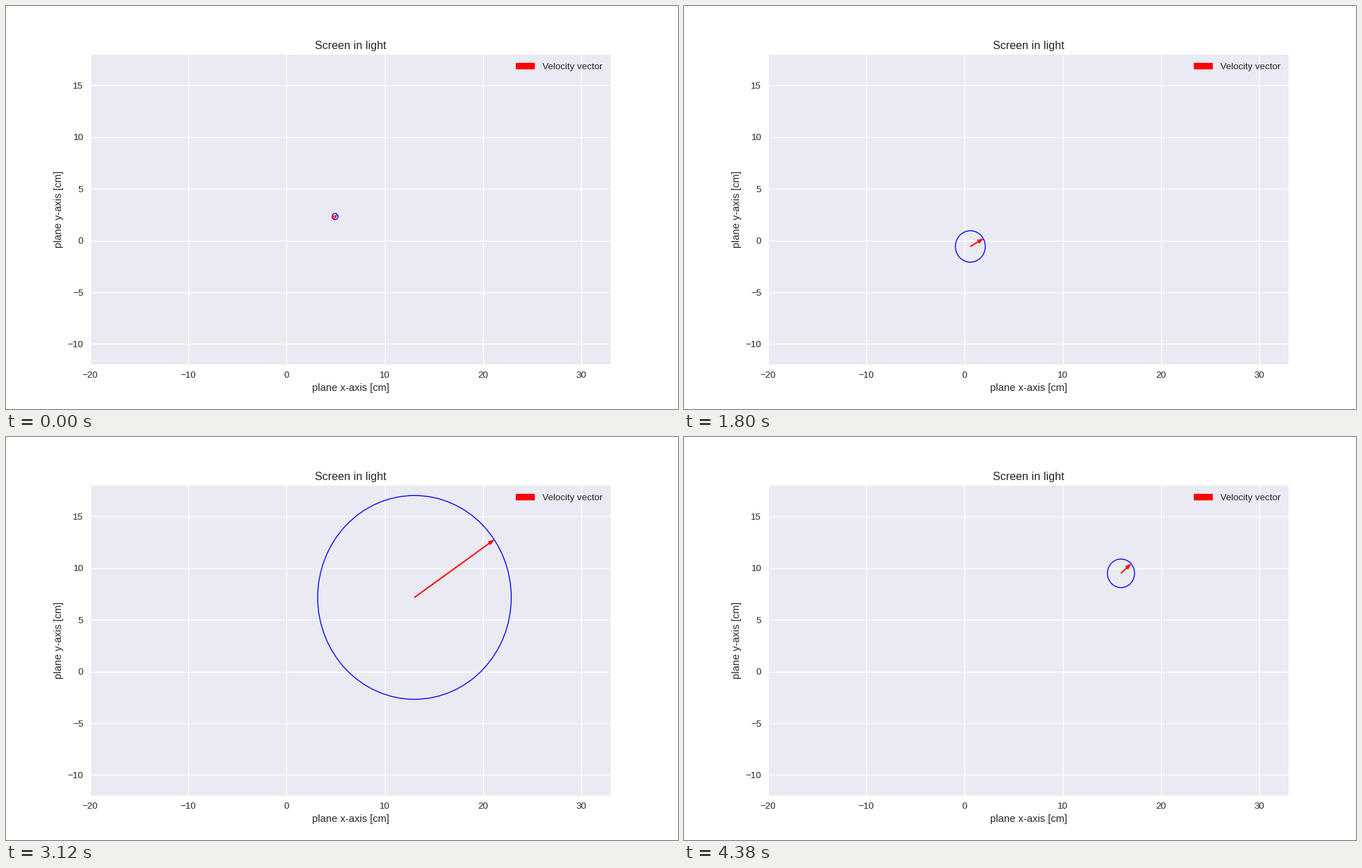
Write a matplotlib script that moves like this. It is 966x580 px and loops after 6.16 s.

```python
import numpy as np
import matplotlib.pyplot as plt
from matplotlib.animation import FuncAnimation
from matplotlib.patches import Circle, FancyArrow

plt.style.use("seaborn-v0_8")
plt.rcParams["font.family"] = "Liberation Sans"

WIDTH, HEIGHT, DPI = 966, 580, 96.6
INTERVAL = 20          # ms per animation frame
FRAMES = 308
TICKS_PER_STEP = 3     # the picture advances every 60 ms
LAST_STEP = 73
DT = 0.1               # simulated seconds per step
START = (4.94, 2.32)

# Turning points of the motion: {step: signed speed} and {step: heading in degrees}
SPEED = {0: 0.3, 2: -4.7, 7: -2.05, 13: -5.9, 15: -3.33, 22: 1.8, 26: 0.25,
         30: 1.52, 34: 2.03, 38: 4.6, 41: 4.86, 45: 12.2, 46: 12.16, 52: 9.85,
         56: 3.0, 59: 7.5, 62: -0.6, 66: -3.3, 73: 1.38}
HEADING = {15: 32.4, 20: 15, 30: 29.6, 38: 25, 42: 25, 46: 36.9, 52: 34.5,
           59: 44.3, 73: 42}


def ramp(points):
    """Straight ramps between the turning points, one value per step."""
    return np.interp(np.arange(LAST_STEP + 1), list(points), list(points.values()))


angle = np.radians(ramp(HEADING))
velocity = ramp(SPEED)[:, None] * np.column_stack([np.cos(angle), np.sin(angle)])
moves = (velocity[1:] + velocity[:-1]) / 2 * DT
position = np.cumsum(np.vstack([START, moves]), axis=0)

# the small margin keeps the pixel size from being rounded down
fig, ax = plt.subplots(
    figsize=((WIDTH + 0.01) / DPI, (HEIGHT + 0.01) / DPI), dpi=DPI)
ax.set(xlim=(-20, 33), ylim=(-12, 18), title="Screen in light",
       xlabel="plane x-axis [cm]", ylabel="plane y-axis [cm]")
ax.set_xticks(range(-20, 31, 10))
ax.set_yticks(range(-10, 16, 5))

circle = ax.add_patch(Circle(START, 1, fill=False, color="blue", lw=1))
arrow = ax.add_patch(FancyArrow(
    *START, 1, 1, width=0.1, head_width=0.4, head_length=0.6,
    length_includes_head=True, color="red", label="Velocity vector"))
legend = ax.legend(handles=[arrow], loc="upper right")


def update(frame):
    step = min(frame // TICKS_PER_STEP, LAST_STEP)
    (x, y), (vx, vy) = position[step], velocity[step]
    speed = np.hypot(vx, vy)
    circle.set(center=(x, y), radius=speed)
    arrow.set_data(x=x, y=y, dx=vx, dy=vy)
    # the legend makes room when the circle reaches its corner
    crowded = x + speed > 22.95 and y + speed > 16
    legend.set_loc("upper left" if crowded else "upper right")
    return circle, arrow, legend


anim = FuncAnimation(fig, update, frames=FRAMES, interval=INTERVAL,
                     repeat=True, repeat_delay=0)
plt.show()
```
